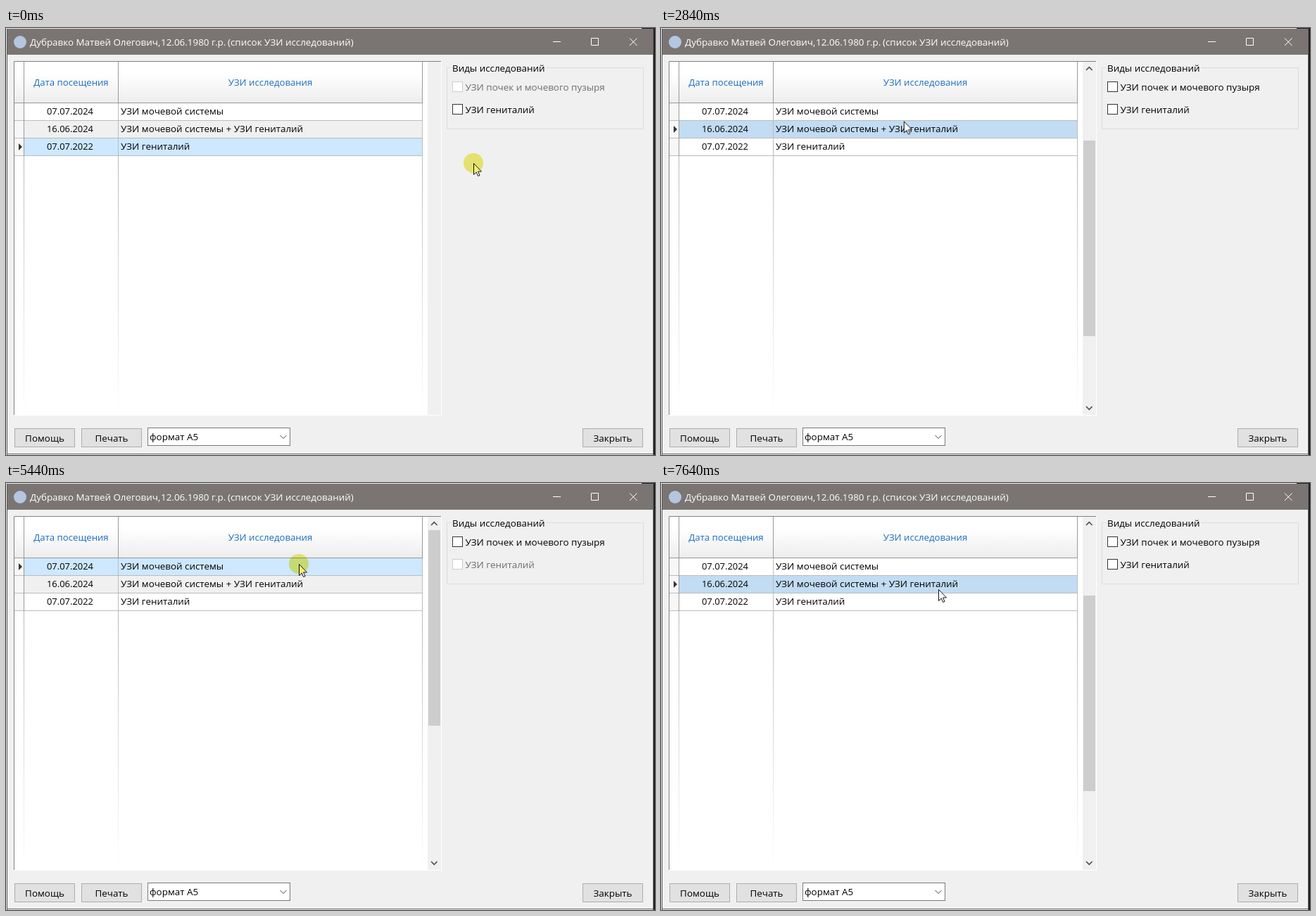
An HTML page for the animation above (8 s loop, 922 by 607 pixels).

```html
<!DOCTYPE html>
<html lang="ru">
<head>
<meta charset="utf-8">
<title>Список исследований</title>
<style>
html, body { margin: 0; width: 100%; height: 100%; overflow: hidden; background: #f0f0f0; }
svg { display: block; width: 922px; height: 607px; }
text { font: 13.42px "Open Sans", "Noto Sans", sans-serif; fill: currentColor; stroke: none; }
.mid { text-anchor: middle; }
.date { font-size: 12.95px; }
.head { color: #1a6ebd; }
.head text { font-size: 13.2px; }
.line { fill: none; stroke-width: 1; }
.btn rect { fill: #e1e1e1; stroke: #adadad; }

/* 1% = 80 ms */
.mark, .thumb, .pick, .kidney, .genital, .bar, .click { animation: 8s step-end infinite; }
.mark { animation-name: mark; }
.thumb { animation-name: thumb; }
.pick { animation-name: pick; }
.kidney { animation-name: kidney; }
.genital { animation-name: genital; }
.bar { animation-name: bar; }
.click { animation-name: click; }
.cursor { animation: move 8s linear infinite; }

@keyframes mark {
  0% { transform: translateY(50px); }
  32%, 94.5%, 100% { transform: translateY(25px); }
  67.5% { transform: translateY(0); }
}
@keyframes thumb {
  0% { transform: translateY(186px); }
  32%, 94.5%, 100% { transform: translateY(93px); }
  67.5% { transform: translateY(0); }
}
@keyframes pick {
  0% { transform: translateY(50px); fill: #cde8ff; }
  32%, 94.5%, 100% { transform: translateY(25px); fill: #c1dcf3; }
  67.5% { transform: translateY(0); fill: #cde8ff; }
}
@keyframes kidney {
  0% { color: #6d6d6d; stroke: #ccc; }
  32%, 100% { color: #000; stroke: #333; }
}
@keyframes genital {
  0%, 94.5%, 100% { color: #000; stroke: #333; }
  67.5% { color: #6d6d6d; stroke: #ccc; }
}
@keyframes bar {
  0% { opacity: 0; }
  1%, 100% { opacity: 1; }
}
@keyframes click {
  0%, 31.5%, 67%, 94% { opacity: 1; }
  1%, 33%, 68.5%, 95.5%, 100% { opacity: 0; }
}
@keyframes move {
  0%, 1% { transform: translate(664px, 192px); }
  5% { transform: translate(652px, 150px); }
  10.5% { transform: translate(640px, 107px); }
  11.5%, 12.5% { transform: translate(638px, 103px); }
  14% { transform: translate(622px, 108px); }
  16% { transform: translate(650px, 80px); }
  19% { transform: translate(824px, 88px); }
  21.5%, 22.5% { transform: translate(656px, 62px); }
  25.5% { transform: translate(500px, 108px); }
  28.5%, 35% { transform: translate(319px, 138px); }
  39% { transform: translate(520px, 95px); }
  42% { transform: translate(775px, 62px); }
  44% { transform: translate(690px, 50px); }
  45.5% { transform: translate(645px, 72px); }
  47.5%, 48.5% { transform: translate(640px, 78px); }
  50% { transform: translate(830px, 84px); }
  52% { transform: translate(700px, 120px); }
  54% { transform: translate(540px, 175px); }
  56.5% { transform: translate(637px, 122px); }
  60% { transform: translate(419px, 140px); }
  62.5%, 64.5% { transform: translate(419px, 139px); }
  66.5%, 69% { transform: translate(416px, 115px); }
  74% { transform: translate(603px, 115px); }
  77.5%, 80% { transform: translate(690px, 114px); }
  82% { transform: translate(640px, 80px); }
  85% { transform: translate(540px, 140px); }
  89.5% { transform: translate(431px, 85px); }
  91%, 100% { transform: translate(394px, 151px); }
}
</style>
</head>
<body>
<svg viewBox="0 0 922 607">
  <defs>
    <linearGradient id="header" x2="0" y2="1">
      <stop offset=".3" stop-color="#fff"/><stop offset="1" stop-color="#ededed"/>
    </linearGradient>
    <linearGradient id="fade" x2="0" y2="1">
      <stop stop-color="#b8b8b8"/><stop offset="1" stop-color="#fff"/>
    </linearGradient>
  </defs>

  <!-- window -->
  <rect width="922" height="607" fill="#f0f0f0"/>
  <rect x="1" y="1" width="919" height="37" fill="#7a7573"/>
  <rect x="1" y="1" width="1" height="606" fill="#555"/>
  <rect x="919" y="1" width="1" height="606" fill="#666"/>
  <rect x="920" width="2" height="607" fill="#1e1e1e"/>
  <rect x="903" width="19" height="1" fill="#1e1e1e"/>
  <rect x="1" y="605" width="919" height="1" fill="#666"/>
  <circle cx="20" cy="20" r="9" fill="#b4c6e0"/>
  <text y="25" color="#fff"><tspan x="34">Дубравко Матвей Олегович,</tspan><tspan x="220">12.06.1980 г.р.</tspan><tspan x="315">(список УЗИ исследований)</tspan></text>
  <path class="line" stroke="#fff" d="M777 19.5h11M831.5 14.5h10v10h-10zM886 14.5l10.5 10.5M896.5 14.5l-10.5 10.5"/>

  <!-- table -->
  <rect x="11" y="47" width="588" height="503" fill="#fff"/>
  <rect x="12" y="48" width="579" height="58" fill="url(#header)"/>
  <rect x="12" y="107" width="13" height="75" fill="#f7f7f7"/>
  <rect x="26" y="132" width="565" height="24" fill="#f0f0f0"/>
  <rect class="pick" x="26" y="107" width="565" height="24"/>
  <path class="line" stroke="#bcbcbc" d="M12 131.5H592M12 156.5H592M12 181.5H592M159.5 107V182M591.5 107V182"/>
  <path class="line" stroke="#999" d="M12 106.5H592M25.5 48V182M159.5 48V107M591.5 48V107"/>
  <g fill="url(#fade)">
    <rect x="25" y="182" width="1" height="368"/>
    <rect x="159" y="182" width="1" height="368"/>
    <rect x="591" y="182" width="1" height="368"/>
  </g>
  <path class="line" stroke="#828282" d="M11.5 550V47.5H618"/>
  <path class="line" stroke="#fff" d="M11 550.5H618.5V47"/>
  <path class="mark" d="M18 114l5 5-5 5z" fill="#333"/>
  <g class="head mid">
    <text x="92.5" y="82">Дата посещения</text>
    <text x="375.5" y="82">УЗИ исследования</text>
  </g>
  <g class="mid">
    <text class="date" x="91" y="123">07.07.2024</text>
    <text class="date" x="91" y="148">16.06.2024</text>
    <text class="date" x="91" y="173">07.07.2022</text>
  </g>
  <text x="163" y="123">УЗИ мочевой системы</text>
  <text x="163" y="148">УЗИ мочевой системы + УЗИ гениталий</text>
  <text x="163" y="173">УЗИ гениталий</text>

  <!-- scrollbar -->
  <rect x="599" y="48" width="19" height="502" fill="#f0f0f0"/>
  <g class="bar">
    <rect class="thumb" x="600" y="67" width="17" height="278" fill="#cdcdcd"/>
    <path fill="none" stroke="#505050" stroke-width="1.7" d="M604 60l4.3-4.3 4.3 4.3M604 538l4.3 4.3 4.3-4.3"/>
  </g>

  <!-- options -->
  <path class="line" stroke="#dcdcdc" d="M632 56.5H626.5V143.5H905.5V56.5H767"/>
  <text x="634" y="62">Виды исследований</text>
  <g class="kidney">
    <rect x="634.5" y="76.5" width="14" height="14" fill="#fff"/>
    <text x="652.5" y="89">УЗИ почек и мочевого пузыря</text>
  </g>
  <g class="genital">
    <rect x="634.5" y="108.5" width="14" height="14" fill="#fff"/>
    <text x="652.5" y="121">УЗИ гениталий</text>
  </g>

  <!-- bottom row -->
  <g class="btn mid">
    <rect x="12.5" y="569.5" width="85" height="26"/>
    <text x="55" y="588">Помощь</text>
    <rect x="107.5" y="569.5" width="85" height="26"/>
    <text x="150" y="588">Печать</text>
    <rect x="819.5" y="569.5" width="85" height="26"/>
    <text x="862" y="588">Закрыть</text>
  </g>
  <rect x="201.5" y="568.5" width="202" height="25" fill="#fff" stroke="#7a7a7a"/>
  <text x="204" y="586">формат А5</text>
  <path fill="none" stroke="#444" d="M389.5 579l4.5 4.5 4.5-4.5"/>

  <!-- the highlight tints the pointer but keeps its outline -->
  <g class="cursor">
    <path d="M.5.5V16.5L4.2 13 6.6 18.5 9 17.5 6.6 12H11.5Z" fill="#fff" stroke="#111"/>
    <circle class="click" r="14" fill="#f3f075" style="mix-blend-mode: multiply"/>
  </g>
</svg>
</body>
</html>
```
